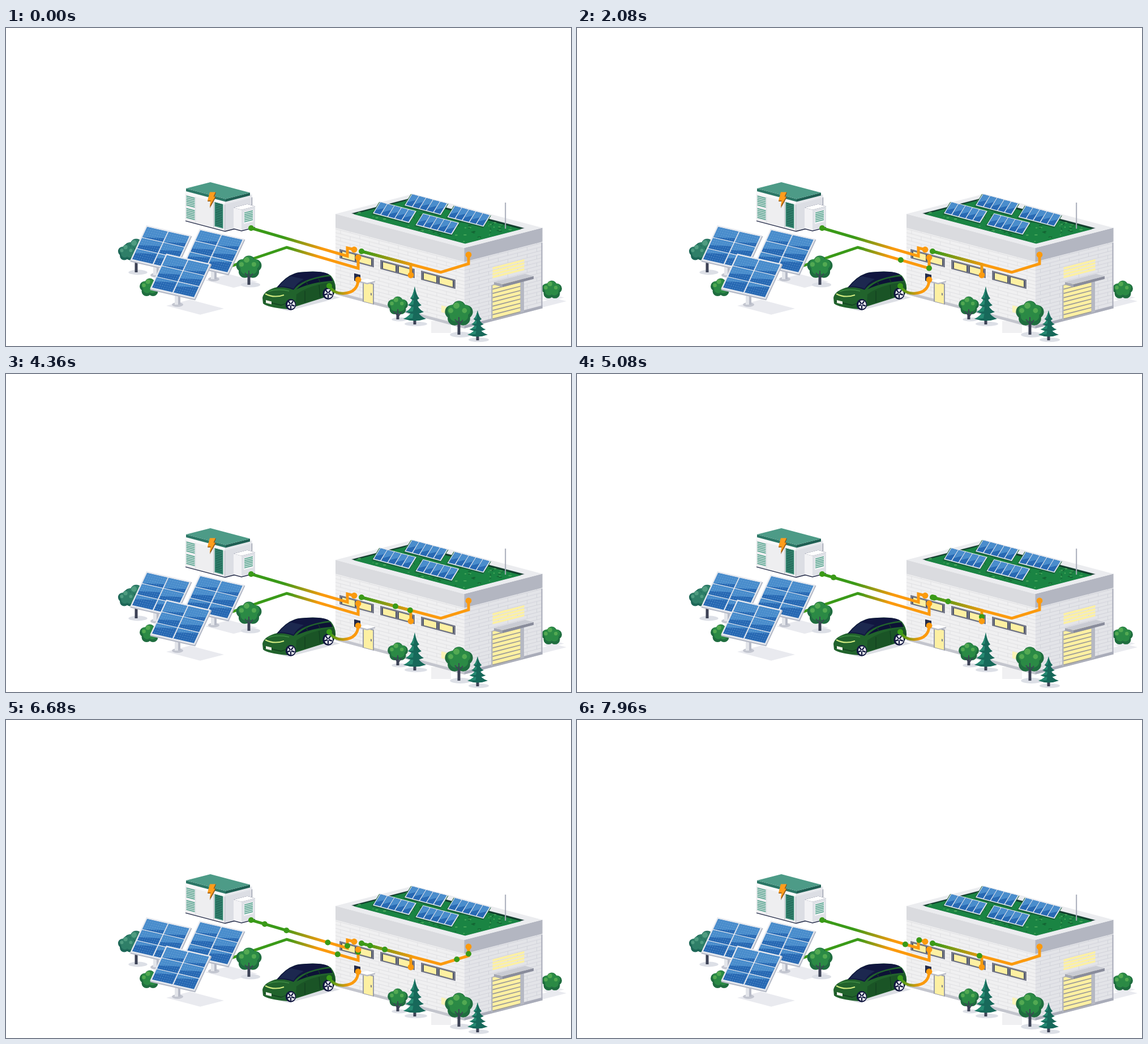
These frames come from a looping animation (998 px wide and 561 px high, 8000 ms). An HTML page:

```html
<!DOCTYPE html>
<html lang="en">
<head>
<meta charset="utf-8">
<title>Energy flow</title>
<style>
html, body { margin: 0; width: 100%; height: 100%; overflow: hidden; background: #fff; }
svg { display: block; width: 100vw; height: 100vh; }
.wire { fill: none; stroke-width: 5; }
</style>
</head>
<body>
<svg id="stage" viewBox="0 0 998 561" preserveAspectRatio="none"></svg>
<script>
const GREEN = '#3a9a18', ORANGE = '#fb9a0e', NAVY = '#11163f', YELLOW = '#fdf0a2', SHADE = '#e9eaef';
const DOWN = .264, UP = -.257; // slopes of left and right walls

let seed = 7;
const rnd = () => (seed = seed * 16807 % 2147483647) / 2147483647;

const rep = (n, f) => Array.from({ length: n }, (_, i) => f(i)).join('');
const rect = (x, y, w, h, fill) => `<rect x="${x}" y="${y}" width="${w}" height="${h}" fill="${fill}"/>`;
const path = (d, fill, stroke = 'none', width = 1.3) =>
  `<path d="${d}" fill="${fill}" stroke="${stroke}" stroke-width="${width}"/>`;
const oval = (x, y, rx, ry, fill) => `<ellipse cx="${x}" cy="${y}" rx="${rx}" ry="${ry}" fill="${fill}"/>`;
const dot = (x, y, fill, r = 5) => oval(x, y, r, r, fill);
const group = (body, ...m) => `<g transform="matrix(${m})">${body}</g>`;

// flat parallelogram: left corner, run to the front corner, run to the back corner
const slab = (x, y, w, d, fill) =>
  path(`M${x} ${y}l${w} ${w * DOWN}l${d} ${d * UP}l${-w} ${-w * DOWN}z`, fill);

// solid block with optional drawings on its left and right walls
const block = (x, y, w, d, h, [top, left, right], onLeft = '', onRight = '') =>
  group(rect(0, 0, w, h, left) + onLeft, 1, DOWN, 0, 1, x, y) +
  group(rect(0, 0, d, h, right) + onRight, 1, UP, 0, 1, x + w, y + w * DOWN) +
  slab(x, y, w, d, top);

const grad = (id, x1, y1, x2, y2) =>
  `<linearGradient id="${id}" gradientUnits="userSpaceOnUse" x1="${x1}" y1="${y1}" x2="${x2}" y2="${y2}">
   <stop offset="0" stop-color="${GREEN}"/><stop offset="1" stop-color="${ORANGE}"/></linearGradient>`;

const brick = (id, base, line) =>
  `<pattern id="${id}" width="34" height="13" patternUnits="userSpaceOnUse">
   ${rect(0, 0, 34, 13, base) + path('M0 .5H34M0 7H34M9 .5V7M26 7V13', 'none', line, .9)}</pattern>`;

const defs = `<defs>
  ${grad('gA', 490, 369, 560, 389)}${grad('gB', 498, 387, 552, 403)}
  ${grad('gC', 573, 456, 608, 464)}${grad('gD', 632, 395, 722, 419)}
  ${brick('brickL', '#f0f0f1', '#dddee1')}${brick('brickR', '#e3e4e8', '#cfd0d8')}
  <pattern id="cells" width="4" height="4" patternUnits="userSpaceOnUse">${dot(2, 2, '#8fbfe8', .5)}</pattern>
</defs>`;

// glass cell with a lighter, slanted glare
const cell = (x, y, w, h, glare) => rect(x, y, w, h, '#2869b3') +
  path(`M${x} ${y}h${w}v${h * glare}L${x} ${y + h * (glare + .35)}z`, '#4a8dcc');

const bigPanel = (x, y) => group(
  rect(1, 1, 81, 65, '#b4b9c6') + rect(0, 0, 80, 64, '#e6e9ef') +
  rep(6, i => cell(2.5 + i % 2 * 38.5, 2.5 + (i >> 1) * 20, 36.5, 18.6, .65 - (i >> 1) * .3)) +
  rect(2, 2, 76, 60, 'url(#cells)'), .9875, .225, -.45, .97, x, y);

const roofPanel = (x, y) => group(
  rect(-1, 1, 66, 22, '#17613a') + rect(0, 0, 64, 21, '#e3e8f0') +
  rep(5, i => cell(1.4 + i * 12.4, 1.2, 11, 18.4, .4)), 1, DOWN, -.62, 1, x, y);

const post = (x, y, h) =>
  oval(x, y + h, 10, 4, '#c3c6d0') + rect(x - 5, y, 10, h, '#e3e5ea') + rect(x + 1, y, 4, h, '#b7bbc7');

const LEAF = ['#1f6d3f', '#2b8a45', '#52a952'], TEAL = ['#1d6757', '#2f7f68', '#4f9c80'];

function crown(x, y, s, [dark, mid, light] = LEAF) {
  const ring = (r, lobe, lift, fill) => rep(5, i => {
    const a = i * Math.PI * .4 - Math.PI / 2;
    return dot(r * Math.cos(a), r * Math.sin(a) * .8 - lift, fill, lobe);
  });
  return group(dot(0, 0, dark, 14) + ring(12, 11, 0, dark) + ring(10, 9, 3, mid) + dot(0, -4, mid, 9) +
    dot(-4, -13, light, 5) + dot(-13, -5, light, 4) + dot(9, -5, light, 4), s, 0, 0, s, x, y);
}

const tree = (x, y, s, foot, tones) => oval(x + 3, foot, 17 * s, 4.5 * s, '#dcdfe6') +
  path(`M${x} ${y}V${foot}`, 'none', '#3d4356', 5) + crown(x, y, s, tones) +
  path(`M${x} ${foot - 4}V${y + 6}m0 12l-7 -8m7 10l7 -9`, 'none', '#3d4356', 1.8);

function spruce(x, top, w, h) {
  const tier = i => {
    const y = top + h * i * .2, r = w * (.4 + i * .2), b = h * .4;
    return path(`M${x} ${y}q${r * .4} ${b * .7} ${r} ${b - 3}q${-r} 7 ${-2 * r} 0q${r * .6} ${3 - b * .3} ${r} ${3 - b}`, '#17695a') +
      path(`M${x} ${y}q${-r * .4} ${b * .7} ${-r} ${b - 3}l${r * .8} -1z`, '#268a72');
  };
  return oval(x + 2, top + h + 6, w, 4, '#dcdfe6') + rect(x - 2.5, top + h - 5, 5, 12, '#3d4356') +
    rep(4, i => tier(3 - i));
}

const slats = (x, y, n, w) => rep(n, i => rect(x, y + i * 3.1, w, 1.9, '#5aa591'));

function battery() {
  const left = slats(2, 3, 6, 15) + slats(2, 25, 6, 15) + rect(18, 0, .8, 47, '#d7d9df') + rect(50, 0, .8, 47, '#aab0b8') +
    rect(52, 1, 15, 43, '#3a8b76') + rep(13, i => rect(53.5, 3 + i * 3.1, 12, 1.3, '#17594a'));
  const vent = rect(4, 5, 17, 21, '#f4f5f6') + slats(5, 6, 6, 15);
  const base = [NAVY, '#262d4a', '#262d4a'];
  return block(317, 292, 70, 48, 49, base) +
    block(316.5, 292, 70, 48, 47.5, ['#fff', '#eeeef0', '#dcdee4'], left) +
    block(316.5, 287, 70, 48, 6, ['#fff', '#f8f8f9', '#e6e8ec']) +
    block(318, 283, 70, 43, 5, ['#4d9b87', '#2b7766', '#1f5f53']) +
    block(402, 317, 14, 24, 38, base) +
    block(402, 317, 14, 24, 36.5, ['#fff', '#f2f2f5', '#dfe1e7'], '', vent) +
    path('M361 290h10l-3 8h3l-11 20l2 -12h-6z', '#8a531a') + path('M360 289.5h10l-3.500 8h3l-10 18l2 -11h-5.500z', '#ff9d1c');
}

function building() {
  const pane = (u, w) => rect(u, 62.5, w, 12, '#4f5568') + rect(u + 2, 63, w - 4, 11, YELLOW);
  const windows = rep(3, i => {
    const u = 7 + i * 72;
    return rect(u - 1, 59, 63, 18.5, '#fafafa') + rect(u, 60, 61, 16.5, '#777b8b') + pane(u + 3, 26) + pane(u + 31, 27);
  });
  const door = rect(48, 105, 20, 37, '#9a9da9') + rect(50, 107, 16, 34, YELLOW) + rect(62, 123, 2, 4, '#777b8b');
  const left = rect(0, 137, 228, 5, '#c3c5cd') + rect(0, 0, 228, 24.5, '#dadbdf') + windows + door +
    rect(33, 96, 11, 13, '#232a49') + rect(187, 112, 11, 12, '#fbf3b8');
  const gate = rect(47.5, 78, 58, 62, '#b5b8c3') + rect(50, 78, 49, 61, '#9d9c98') +
    rep(8, i => rect(50, 79 + i * 7.5, 49, 5.6, YELLOW));
  const right = rect(0, 137, 138, 5, '#a9acb9') + rect(0, 0, 138, 24.5, '#b3b6c1') + rect(136, 26, 2, 116, '#a9acb9') +
    rep(4, i => rect(50, 47 + i * 5.2, 56, 3.8, YELLOW)) + gate;
  const specks = rep(120, () => {
    const a = 4 + rnd() * 96, b = 4 + rnd() * 190;
    return oval(611 + a + b, 327 + a * UP + b * DOWN, 1 + rnd() * 2.4, .5 + rnd() * .8, rnd() < .5 ? '#4aa85c' : '#146534');
  });
  const panels = rep(4, i => roofPanel(661 + (i >> 1) * 75.5 + i % 2 * 56, 306 + (i >> 1) * 20.7 - i % 2 * 14));
  return rect(751, 517, 35, 21, '#f0f0f2') + slab(930, 487, 20, 40, SHADE) +
    block(582, 328, 227.5, 138, 142, ['#ebecef', 'url(#brickL)', 'url(#brickR)'], left, right) +
    slab(609, 327, 202, 106, '#b9bdc7') + slab(611, 327, 200, 104, '#123f2c') + slab(614, 328.5, 197, 99, '#1a8443') +
    specks + panels + rect(881.2, 308, 2, 46, '#a9adba') +
    block(862, 448, 15, 55, 5, ['#c9cbd3', '#a4a7b3', '#898c9b']) +
    block(624, 446, 14, 14, 2.5, ['#fff', '#b8bbc6', '#b8bbc6']);
}

function wheel(x, y, r) {
  const spokes = rep(5, i => path(`M0 0l${r * .75 * Math.sin(i * 1.257)} ${r * .75 * Math.cos(i * 1.257)}`, 'none', NAVY, 2.4));
  return group(dot(0, 0, NAVY, r) + dot(.8, 0, '#eef0f4', r - 2.5) + spokes + dot(0, 0, '#cfd3de', 1.6), .92, 0, 0, 1, x, y);
}

const car = () => slab(456, 488, 42, 92, '#dcdee4') +
  path('M453 476Q455 463 479 457Q497 434 518 431Q560 426 574 437Q583 448 582 461L579 470L497 496Q462 493 454 486Z', '#21632c') +
  path('M513 470Q535 453 578 448L582 460L579 470L512 490Z', '#1a5426') +
  path('M478 458Q497 434 518 431Q560 427 571 435Q520 443 508 462Q493 456 478 458Z', NAVY) +
  path('M482 456Q494 441 503 438L526 443Q513 450 508 460Q494 455 482 456Z', '#1c284f') +
  path('M513 461Q530 442 573 438L577 446Q540 448 513 461Z', '#0d1236') +
  path('M530 447l3 7M552 442l3 7M528 464v20M553 453l2 22M456 482L486 489L494 486', 'none', '#123f20') +
  path('M458 469Q473 477 491 471', 'none', '#d6ee83', 2) +
  path('M463 465Q480 459 500 464', 'none', '#3f8d43') +
  path('M459 480l10 2.500v5l-10 -2.500z', '#f2f3ea') +
  wheel(503, 488, 10) + wheel(569, 468.5, 10.5);

const wires = {
  bat: ['M433 353L603 402.500V388L615 391', 'gA'],
  sun: ['M380 426L496 387L622 424V405', 'gB'],
  car: ['M571 455C577 466 588 469 598 468C613 467 622 458 622 444', 'gC'],
  roof: ['M628 394L768 431L817 416V400', 'gD'],
  room: ['M628 394L715 417V436', 'gD']
};
const ends = [[433, 353], [571, 455], [628, 394]], sinks = [[615, 391], [622, 405], [622, 444], [715, 436], [817, 400]];

const stage = document.getElementById('stage');
stage.innerHTML = defs + slab(948, 478, 14, 24, SHADE) + crown(964, 462, .8) +
  building() + battery() + slab(352, 445, 50, 42, SHADE) + slab(283, 490, 60, 42, SHADE) +
  tree(230, 392, .98, 431, TEAL) + crown(214, 396, .72, TEAL) + car() +
  Object.entries(wires).map(([id, [d, g]]) => `<path id="${id}" class="wire" d="${d}" stroke="url(#${g})"/>`).join('') +
  '<g id="pulses"></g>' +
  post(265, 420, 16) + bigPanel(248, 348) + post(367, 428, 15) + bigPanel(342, 354) +
  crown(254, 458, .8) + post(303, 468, 20) + bigPanel(283, 398) +
  tree(429, 422, 1, 453) + tree(692, 490, .8, 514) + spruce(722, 456, 20, 60) +
  tree(800, 504, 1.1, 541) + spruce(833, 498, 18, 46) +
  ends.map(p => dot(...p, GREEN)).join('') + sinks.map(p => dot(...p, ORANGE, 5.4)).join('');

// wire, speed in px per ms, gap between the two pulses of a pair, start of each pair in ms
const runs = [
  ['sun', .138, 380, [240, 4735]],
  ['room', .0548, 490, [2740, 5905]],
  ['bat', .1, 400, [4870, 6030]],
  ['roof', .107, 235, [4815]],
  ['car', .085, 400, [5108]]
];
const pulses = [];
for (const [id, speed, gap, pairs] of runs) {
  const track = document.getElementById(id), len = track.getTotalLength();
  for (const start of pairs.flatMap(t => [t, t + gap])) {
    const el = document.createElementNS('http://www.w3.org/2000/svg', 'circle');
    el.setAttribute('r', 5);
    el.setAttribute('fill', id === 'car' ? ORANGE : GREEN);
    document.getElementById('pulses').append(el);
    pulses.push({ el, track, len, speed, start });
  }
}

function draw(now) {
  const t = Math.floor(now % 8000 / 40) * 40;
  for (const { el, track, len, speed, start } of pulses) {
    const s = (t - start) * speed, on = s >= 0 && s <= len;
    el.setAttribute('visibility', on ? 'visible' : 'hidden');
    if (!on) continue;
    const p = track.getPointAtLength(s);
    el.setAttribute('cx', p.x);
    el.setAttribute('cy', p.y);
  }
}

const t0 = performance.now();
function tick() {
  draw(performance.now() - t0);
  requestAnimationFrame(tick);
}
draw(0);
requestAnimationFrame(tick);
</script>
</body>
</html>
```
